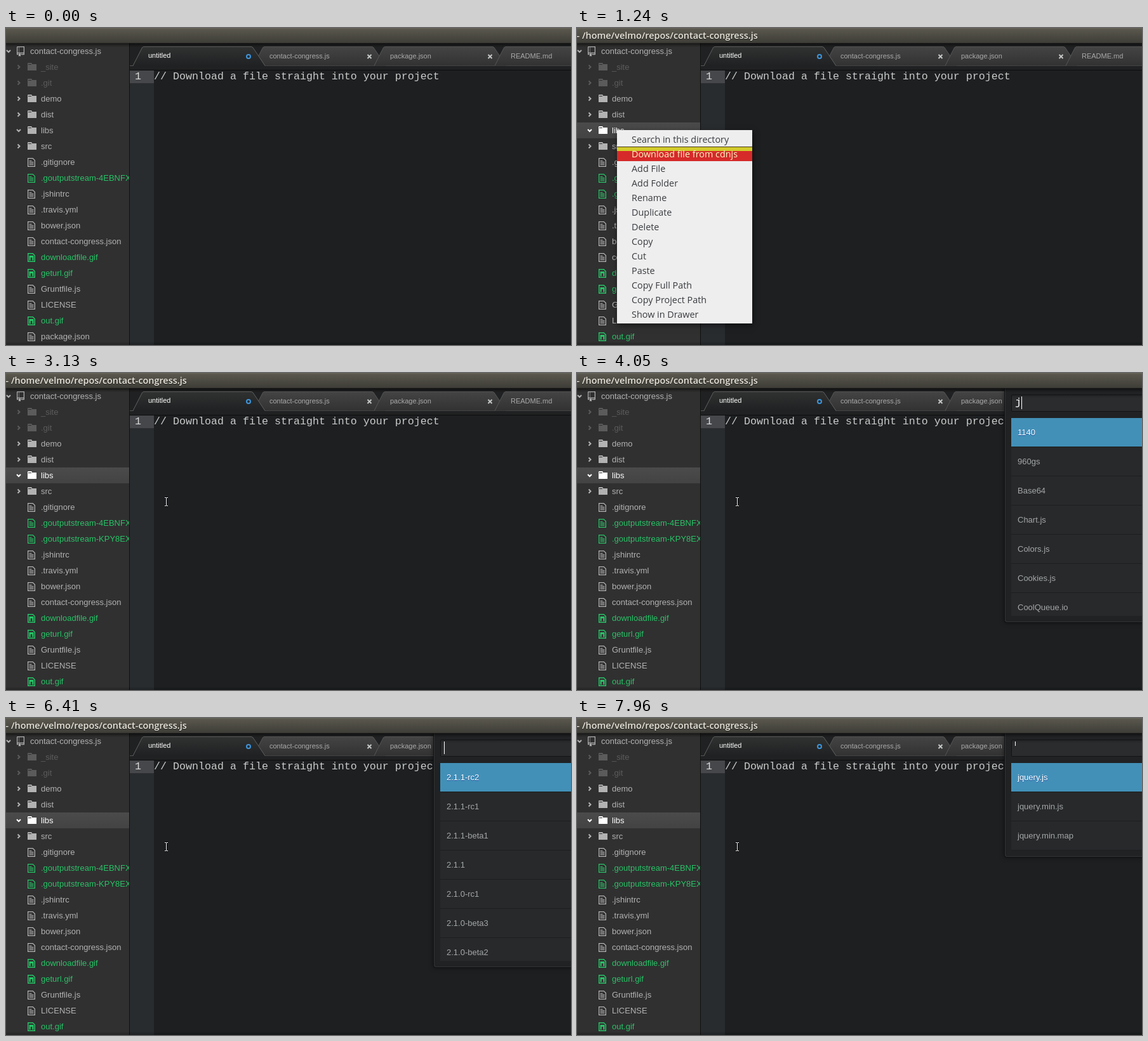
An HTML page that plays this animation: 890 px wide and 500 px high, repeating every 8 s.

```html
<!DOCTYPE html>
<html lang="en">
<head>
<meta charset="utf-8">
<title>Download a file into a project</title>
<style>
html, body { margin: 0; width: 100%; height: 100%; overflow: hidden; background: #1d1f21; }
body { position: relative; font: 13px/25px "Liberation Sans", Arial, sans-serif; color: #b2b2b2; }
div, svg { position: absolute; }
svg { display: block; overflow: visible; }
.anim { animation: 8s step-end -4ms infinite; }

/* window title */
#bar { left: 0; top: 0; width: 890px; height: 24px; background: linear-gradient(#68665a, #59574d 2px, #3e3d37 23px, #2a2925); }
#bar div { left: -.4px; top: 0; white-space: pre; font: 600 14.4px/24px "Open Sans", "Noto Sans", sans-serif; color: #eae6dc; text-shadow: 0 1px 1px #222; animation-name: title; }
#shade { left: 0; top: 24px; width: 890px; height: 6px; background: linear-gradient(rgba(0,0,0,.5), transparent); }
#foot { left: 0; top: 495px; width: 890px; height: 5px; background: linear-gradient(transparent, rgba(0,0,0,.25)); }

/* project tree */
#tree { left: 0; top: 24px; width: 194px; height: 476px; overflow: hidden; background: #303030; }
#list { left: 0; top: 0; width: 194px; }
#list .row { position: relative; width: 194px; height: 25px; overflow: hidden; white-space: nowrap; }
#list span { position: absolute; left: 55px; top: 0; }
#list .root span { left: 38px; }
.dim { color: #5b5b5b; }
.new { color: #29c267; }
.libs { animation-name: libs; }
.late { animation-name: late; }
#band { left: 0; top: 0; width: 194px; height: 20px; background: #272727; animation-name: band; }
#band::after { content: ""; position: absolute; left: 36px; top: 20px; width: 56px; height: 6px; background: #292929; }

/* editor */
#edge { left: 194px; top: 24px; width: 1px; height: 476px; background: #101010; }
#tabs { left: 0; top: 0; }
#tabs text { font-size: 11px; fill: #a9a9a9; }
#gutter { left: 195px; top: 67px; width: 38px; height: 433px; background: #292c2f; }
#line { left: 195px; top: 67px; width: 38px; height: 20px; background: #45474a; }
.code { font: 16.667px/20px "Liberation Mono", "Courier New", monospace; color: #c8cbc9; white-space: pre; }
#ibeam { left: 249px; top: 195px; animation-name: ibeam; }

/* context menu */
#menu { left: 63px; top: 161px; width: 213px; height: 299px; padding: 3px 0; background: #eee; box-shadow: 1px 3px 9px rgba(0,0,0,.5); font: 14.4px/23px "Open Sans", "Noto Sans", sans-serif; color: #3a3c40; animation-name: menu; }
#menu div { position: relative; box-sizing: border-box; height: 23px; padding-left: 23px; white-space: nowrap; }
#menu div:nth-child(1) { animation-name: hover1; }
#menu div:nth-child(2) { animation-name: hover2; }

/* pick list */
#panel { left: 673px; top: 24px; width: 230px; height: 369px; box-sizing: border-box; border: solid #101112; border-width: 0 0 1px 1px; border-radius: 0 0 0 4px; background: #202224; box-shadow: inset 1px -1px #313335, 0 0 7px rgba(0,0,0,.5); overflow: hidden; animation-name: panel; }
#input { left: 10px; top: 10px; width: 230px; height: 27px; box-sizing: border-box; border: 1px solid #121314; border-radius: 2px; background: linear-gradient(#222425, #2a2c2e 5px); }
#typed { left: 5px; top: 2px; overflow: hidden; color: #fff; animation-name: typed; }
#caret { left: 16px; top: 13px; width: 1px; height: 20px; background: #fff; animation-name: caret; }
.items { left: 10px; top: 47px; width: 230px; height: 312px; overflow: hidden; opacity: 0; color: #a4a7a8; background: #27292b; }
.items div { position: relative; box-sizing: border-box; height: 46px; padding-left: 10px; line-height: 45px; border-bottom: 1px solid #1c1e1f; white-space: nowrap; }
.items div:first-child { color: #fff; background: #4290b8; text-shadow: 0 1px #1b4f9c; }
#all { animation-name: all; }
#jq { animation-name: jq; }
#jqu { animation-name: jqu; }
#versions { animation-name: versions; }
#files { height: 138px; animation-name: files; }
#versions div { color: #a4a7a8; background: none; text-shadow: none; }
#versions div:nth-child(1) { animation-name: pick1; }
#versions div:nth-child(2) { animation-name: pick2; }
#versions div:nth-child(3) { animation-name: pick3; }
#versions div:nth-child(4) { animation-name: pick4; }

@keyframes title { 0% { opacity: 0 } 7.375%, 100% { opacity: 1 } }
@keyframes band { 0% { opacity: 0 } 7.375% { opacity: 1 } 8.625%, 100% { opacity: 0 } }
@keyframes libs { 0% { color: #b2b2b2; background: none } 1.5%, 100% { color: #fff; background: linear-gradient(#4b4b4b, #434343) } }
@keyframes late { 0% { height: 0; color: #b2b2b2 } 1.5% { height: 25px; color: #b2b2b2 } 11.375%, 100% { height: 25px; color: #29c267 } }
@keyframes ibeam { 0% { opacity: 0 } 39.125%, 100% { opacity: 1 } }
@keyframes menu {
  0% { opacity: 0; background: #eee }
  8.625% { opacity: .5; background: #eee }
  9.25% { opacity: 1; background: #eee }
  30.375% { opacity: 1; background: rgba(225,228,226,.77) }
  31%, 100% { opacity: 0; background: #eee }
}
@keyframes hover1 {
  0% { color: #fdf6c4; background: linear-gradient(#4a3a18 1px, #d2cb2b 1px 7px, #d62a2a 7px) }
  14.875%, 100% { color: #3a3c40; background: none }
}
@keyframes hover2 {
  0% { color: #3a3c40; background: none }
  14.875% { color: #f4e3a0; background: #d62a2a }
  15.5% { color: #fdf6c4; background: linear-gradient(#4a3a18 1px, #d2cb2b 1px 7px, #d62a2a 7px) }
  30.375%, 100% { color: #f0dc9a; background: #d62a2a }
}
@keyframes panel {
  0% { opacity: 0; height: 370px }
  43.375% { opacity: .5; height: 370px }
  44.125% { opacity: 1; height: 370px }
  69.875% { opacity: 1; height: 48px }
  80.125% { opacity: 1; height: 370px }
  94.5%, 100% { opacity: 1; height: 196px }
}
@keyframes typed {
  0% { width: 0 }
  50.625% { width: 10px }
  60.125% { width: 20px }
  64.375% { width: 30px }
  65% { width: 40px }
  69.875%, 100% { width: 0 }
}
@keyframes caret {
  0% { left: 16px; opacity: 1; height: 20px }
  49.125% { left: 16px; opacity: 0; height: 20px }
  50.625% { left: 26px; opacity: 1; height: 20px }
  60.125% { left: 36px; opacity: 1; height: 20px }
  64.375% { left: 46px; opacity: 1; height: 20px }
  65% { left: 56px; opacity: 1; height: 20px }
  69.875% { left: 16px; opacity: 1; height: 20px }
  75% { left: 16px; opacity: 0; height: 20px }
  80.125% { left: 16px; opacity: 1; height: 20px }
  85.125% { left: 16px; opacity: 0; height: 20px }
  90.625% { left: 16px; opacity: 1; height: 20px }
  94.5% { left: 16px; opacity: 0; height: 20px }
  99.5%, 100% { left: 16px; opacity: 1; height: 7px }
}
@keyframes all { 0% { opacity: 1 } 60.125%, 100% { opacity: 0 } }
@keyframes jq { 0% { opacity: 0 } 60.125% { opacity: 1 } 64.375%, 100% { opacity: 0 } }
@keyframes jqu { 0% { opacity: 0 } 64.375% { opacity: 1 } 69.875%, 100% { opacity: 0 } }
@keyframes versions { 0% { opacity: 0 } 80.125% { opacity: 1 } 94.5%, 100% { opacity: 0 } }
@keyframes files { 0% { opacity: 0 } 94.5%, 100% { opacity: 1 } }
@keyframes pick1 { 0% { color: #fff; background: #4290b8; text-shadow: 0 1px #1b4f9c } 87.375%, 100% { color: #a4a7a8; background: none } }
@keyframes pick2 { 0% { color: #a4a7a8; background: none } 87.375% { color: #fff; background: #4290b8 } 89.625%, 100% { color: #a4a7a8; background: none } }
@keyframes pick3 { 0% { color: #a4a7a8; background: none } 89.625% { color: #fff; background: #4290b8 } 91.625%, 100% { color: #a4a7a8; background: none } }
@keyframes pick4 { 0% { color: #a4a7a8; background: none } 91.625%, 100% { color: #fff; background: #4290b8 } }
</style>
</head>
<body>
<svg width="0" height="0">
  <defs>
    <g id="dir"><path d="M0 1q0-1 1-1h5l1 1v1h7v10H0z" fill="currentColor"/><path d="M1 2.5h5" stroke="#303030"/></g>
    <g id="page" fill="none" stroke="currentColor"><path d="M.6.6h7.6l3.2 3.2v9.6H.6z" stroke-width="1.2"/><path d="M2.5 4.5h4M2.5 6.5h7M2.5 8.5h7M2.5 10.5h7"/></g>
    <g id="media"><path d="M.7.7h7.5l3.1 3.1v9.5H.7z" fill="none" stroke="currentColor" stroke-width="1.4"/><path d="M2.5 11.5V4h7v7.5H7.3V7H4.7v4.5z" fill="currentColor"/></g>
    <g id="repo" fill="none" stroke="currentColor"><path d="M.6.6h10.8v12H6.5M2.5 12.6H.6V.6M.6 10.4h10.8" stroke-width="1.2"/><path d="M3.5 2v8" stroke-dasharray="1 1"/><path d="M3 11.5h3V16l-1.5-1.3L3 16z" fill="currentColor" stroke="none"/></g>
    <path id="shut" d="M-1.5-3l3 3-3 3" fill="none" stroke="currentColor" stroke-width="2"/>
    <path id="open" d="M-3-1.5l3 3 3-3" fill="none" stroke="currentColor" stroke-width="2"/>
    <linearGradient id="off" x2="0" y2="1"><stop stop-color="#444"/><stop offset="1" stop-color="#323232"/></linearGradient>
    <linearGradient id="on" x2="0" y2="1"><stop stop-color="#303131"/><stop offset="1" stop-color="#202122"/></linearGradient>
    <path id="tab" d="M0 59.5L14.5 31Q15.5 29.5 17 29.5H186Q188 29.5 189 31L208 59.5"/>
    <path id="cross" d="M-3-3l6 6M3-3l-6 6" stroke="#c4c6c5" stroke-width="2"/>
  </defs>
</svg>

<div id="tree"><div id="band" class="anim"></div><div id="list"></div></div>
<div id="edge"></div>

<svg id="tabs" width="890" height="67">
  <path d="M195 24H890V67H195z" fill="#202122"/>
  <path d="M195 59.5H890" stroke="#555"/>
  <g fill="url(#off)" stroke="#565656">
    <use href="#tab" x="390"/><use href="#tab" x="580"/><use href="#tab" x="770"/>
  </g>
  <use href="#tab" x="200" fill="url(#on)" stroke="#606060"/>
  <path d="M201 60H407" stroke="#202122" stroke-width="2"/>
  <path d="M195 66.5H890" stroke="#0d0e0e"/>
  <text x="224" y="47" style="fill:#fff">untitled</text>
  <text x="415" y="48">contact-congress.js</text>
  <text x="605" y="48">package.json</text>
  <text x="795" y="48">README.md</text>
  <circle cx="382" cy="45" r="3" fill="none" stroke="#3d94da" stroke-width="2"/>
  <use href="#cross" x="572.5" y="45"/><use href="#cross" x="762.5" y="45"/>
</svg>

<div id="gutter"></div>
<div id="line"></div>
<div class="code" style="left:203px;top:67px;color:#dcdcdc">1</div>
<div class="code" style="left:233px;top:67px">// Download a file straight into your project</div>

<svg id="ibeam" class="anim" width="7" height="16" fill="none">
  <path d="M1 1.5h2l.5.5.5-.5h2M3.5 2v12M1 14.5h2l.5-.5.5.5h2" stroke="#000" stroke-width="2.4"/>
  <path d="M1 1.5h2l.5.5.5-.5h2M3.5 2v12M1 14.5h2l.5-.5.5.5h2" stroke="#fff"/>
</svg>

<div id="menu" class="anim"></div>

<div id="panel" class="anim">
  <div id="input"><div id="typed" class="code anim">jque</div></div>
  <div id="caret" class="anim"></div>
  <div id="all" class="items anim"></div>
  <div id="jq" class="items anim"></div>
  <div id="jqu" class="items anim"></div>
  <div id="versions" class="items anim"></div>
  <div id="files" class="items anim"></div>
</div>

<div id="shade"></div>
<div id="foot"></div>
<div id="bar"><div class="anim">- /home/velmo/repos/contact-congress.js</div></div>

<script>
const el = id => document.getElementById(id);
const use = (id, x, y) => `<use href="#${id}" x="${x}" y="${y}"/>`;

// name, icon, classes, arrow
const tree = [
  ["contact-congress.js", "repo", "root", "open"],
  ["_site", "dir", "dim", "shut"],
  [".git", "dir", "dim", "shut"],
  ["demo", "dir", "", "shut"],
  ["dist", "dir", "", "shut"],
  ["libs", "dir", "libs anim", "open"],
  ["src", "dir", "", "shut"],
  [".gitignore", "page"],
  [".goutputstream-4EBNFX", "page", "new"],
  [".goutputstream-KPY8EX", "page", "late anim"],
  [".jshintrc", "page"],
  [".travis.yml", "page"],
  ["bower.json", "page"],
  ["contact-congress.json", "page"],
  ["downloadfile.gif", "media", "new"],
  ["geturl.gif", "media", "new"],
  ["Gruntfile.js", "page"],
  ["LICENSE", "page"],
  ["out.gif", "media", "new"],
  ["package.json", "page"]
];

el("list").innerHTML = tree.map(([name, icon, cls = "", arrow]) => {
  const root = icon === "repo";
  const mark = arrow ? use(arrow, root ? 4 : 20, 12.5) : "";
  const pic = use(icon, root ? 17 : 34, root ? 5 : 6);
  return `<div class="row ${cls}"><svg width="194" height="25">${mark}${pic}</svg><span>${name}</span></div>`;
}).join("");

const fill = (id, names, cls = "") => {
  el(id).innerHTML = names.split("|").map(n => `<div class="${cls}">${n}</div>`).join("");
};

fill("menu", "Search in this directory|Download file from cdnjs|Add File|Add Folder|Rename|Duplicate|Delete|Copy|Cut|Paste|Copy Full Path|Copy Project Path|Show in Drawer");
for (const row of [...el("menu").children].slice(0, 2)) row.className = "anim";
fill("all", "1140|960gs|Base64|Chart.js|Colors.js|Cookies.js|CoolQueue.io");
fill("jq", "jquery|jqPlot|jqModal|jqtouch|jqueryui|jquery.form|jquery-tools");
fill("jqu", "jquery|jqueryui|jquery.form|jquery-tools|jquery-noty|jquery.pjax|jquery-cookie");
fill("versions", "2.1.1-rc2|2.1.1-rc1|2.1.1-beta1|2.1.1|2.1.0-rc1|2.1.0-beta3|2.1.0-beta2", "anim");
fill("files", "jquery.js|jquery.min.js|jquery.min.map");
</script>
</body>
</html>
```
